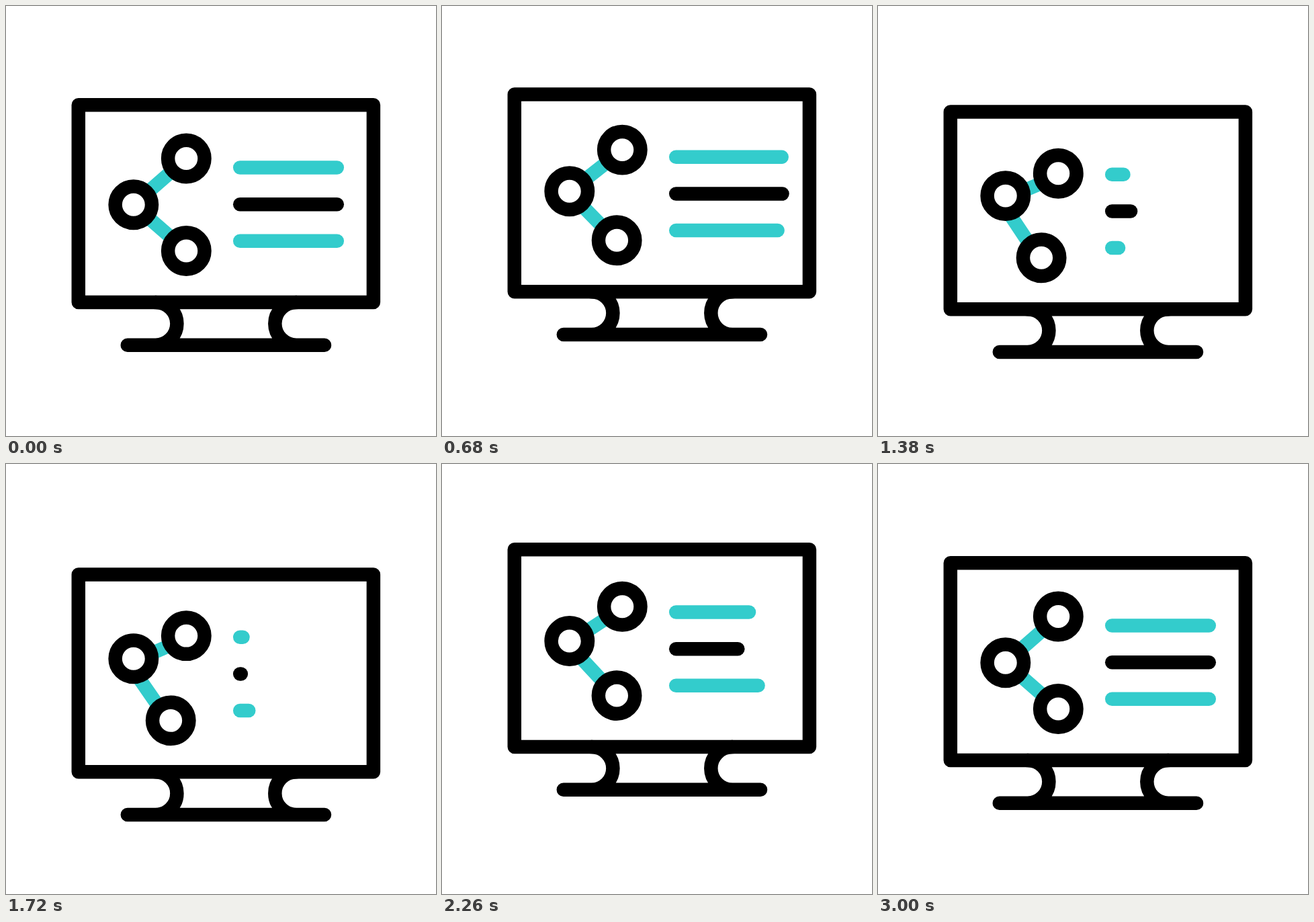
These frames come from a looping animation (640x640 px, 3220 ms). An HTML page:

```html
<!DOCTYPE html>
<html lang="en">
<head>
<meta charset="utf-8">
<title>Share screen</title>
<style>
  html, body { margin: 0; width: 100%; height: 100%; overflow: hidden; background: #fff; }
  svg { display: block; width: 100vw; height: 100vh; }
  svg * { stroke-width: 20.5; stroke-linecap: round; stroke-linejoin: round; }
  .ink { stroke: #000; fill: none; }
  .teal { stroke: #33cccc; fill: none; }
  circle { fill: #fff; stroke: #000; }
</style>
</head>
<body>
<svg viewBox="0 0 640 640">
  <g id="screen">
    <rect class="ink" x="107.8" y="147.2" width="439.1" height="293.7"/>
    <path class="ink" d="M222.5 440.9A31.9 31.9 0 0 1 222.5 504.7M432.2 440.9A31.9 31.9 0 0 0 432.2 504.7M180.8 504.7H474"/>
    <line class="teal" id="linkTop"/>
    <line class="teal" id="linkLow"/>
    <circle id="left" r="27.2"/>
    <circle id="top" r="27.2"/>
    <circle id="low" r="27.2"/>
    <path class="teal" id="row0"/>
    <path class="ink" id="row1"/>
    <path class="teal" id="row2"/>
  </g>
</svg>
<script>
  const LOOP = 3220, STEP = 20;
  const $ = id => document.getElementById(id);
  const set = (el, attrs) => {
    for (const name in attrs) el.setAttribute(name, attrs[name]);
  };

  // Each track is a list of [time, value], eased in and out between keys.
  const bob = [[200, 0], [885, -20], [1615, 20], [2283, -20], [3003, 0]];
  const leftIn = [[370, 0], [1525, 1], [3005, 0]];
  const topIn = [[325, 0], [1470, 1], [2900, 0]];
  const lowIn = [[200, 0], [1475, 1], [2740, 0]];

  const FULL = 492.8, LONG = 506.8, SHORT = 349.8;
  const row = (y, ...times) => ({
    y,
    track: [FULL, LONG, SHORT, SHORT, LONG, FULL].map((x, i) => [times[i], x])
  });
  const rows = [
    row(240.4, 382, 634, 1561, 1643, 2631, 2890),
    row(295.2, 450, 702, 1618, 1710, 2708, 2965),
    row(349.7, 320, 556, 1513, 1549, 2582, 2820)
  ];

  function at(track, t) {
    const next = track.findIndex(key => key[0] > t);
    if (next === 0) return track[0][1];
    if (next < 0) return track[track.length - 1][1];
    const [t0, a] = track[next - 1], [t1, b] = track[next];
    const u = (t - t0) / (t1 - t0);
    return a + (b - a) * u * u * (3 - 2 * u);
  }

  function draw(t) {
    const a = at(leftIn, t), b = at(topIn, t), c = at(lowIn, t);
    const left = { cx: 189.8, cy: 295.8 - 24.5 * a };
    const top = { cx: 268.3, cy: 227 + 12.3 * b };
    const low = { cx: 268.3 - 25.6 * c, cy: 364.5 };

    set($('screen'), { transform: `translate(0 ${at(bob, t)})` });
    set($('left'), left);
    set($('top'), top);
    set($('low'), low);

    // The links drift slightly off the node centres.
    const dip = 4 * a;
    set($('linkTop'), { x1: left.cx, y1: left.cy + dip, x2: top.cx, y2: top.cy + dip });
    set($('linkLow'), { x1: left.cx - 12.5 * a, y1: left.cy, x2: low.cx - 4 * c, y2: low.cy });

    rows.forEach(({ y, track }, i) => {
      set($('row' + i), { d: `M348.2 ${y}H${at(track, t)}` });
    });
  }

  const start = performance.now();
  function tick() {
    const t = (performance.now() - start) % LOOP;
    draw(Math.floor(t / STEP) * STEP);
    requestAnimationFrame(tick);
  }
  tick();
</script>
</body>
</html>
```
